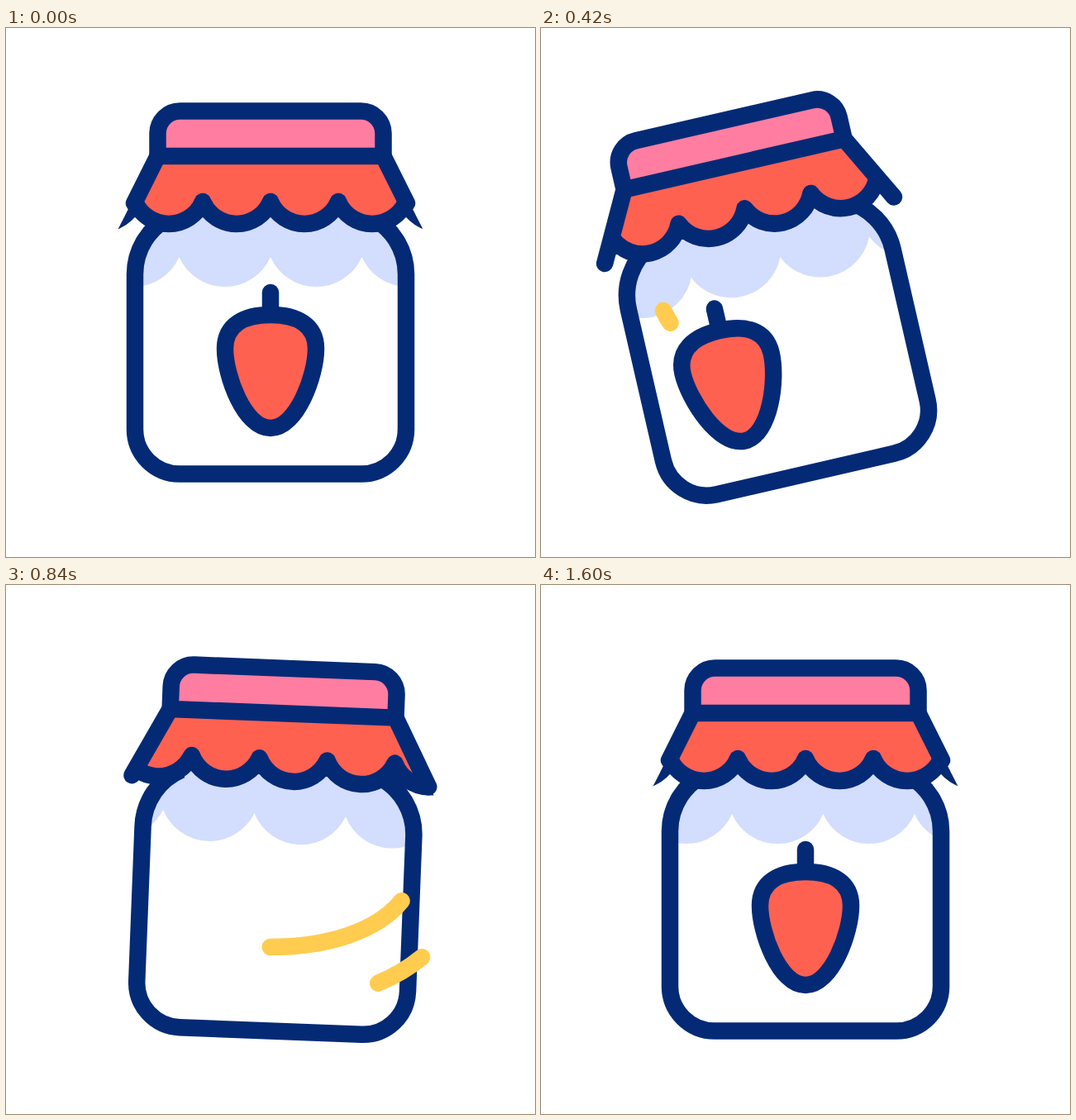
An HTML page for the animation above (2400 ms loop, 640 by 640 pixels).

```html
<!DOCTYPE html>
<html lang="en">
<head>
<meta charset="utf-8">
<title>Spinning jam jar</title>
<style>
  html, body { margin: 0; width: 100%; height: 100%; overflow: hidden; background: #fff; }
  svg { display: block; width: 100vw; height: 100vh; }
  .ink { stroke: #042a76; stroke-width: 20.5; stroke-linejoin: round; }
  .cap { stroke-linecap: round; }
  .red { fill: #ff6151; }
  .swoosh { stroke: #ffcc50; stroke-width: 20.5; }
</style>
</head>
<body>
<svg viewBox="0 0 640 640" fill="none">
  <defs>
    <clipPath id="inside">
      <path d="M200 228A77.5 77.5 0 0 0 156 298V485.500A54 54 0 0 0 210 539.500H430A54 54 0 0 0 484 485.500V298A77.5 77.5 0 0 0 440 228Z"/>
    </clipPath>
    <clipPath id="skirt">
      <path d="M186 145H454L514 262H126Z"/>
    </clipPath>
  </defs>
  <g id="jar">
    <g clip-path="url(#inside)">
      <path id="syrup" fill="#d3ddfe"/>
      <g id="berry" class="ink cap">
        <path d="M320 320V347"/>
        <path class="red" d="M320 347C352 347 375 359 375 388C375 420 352 484 320 484C288 484 265 420 265 388C265 359 288 347 320 347Z"/>
      </g>
    </g>
    <path class="ink" d="M200 228A77.5 77.5 0 0 0 156 298V485.500A54 54 0 0 0 210 539.500H430A54 54 0 0 0 484 485.500V298A77.5 77.5 0 0 0 440 228"/>
    <g clip-path="url(#skirt)">
      <path id="cloth" class="ink red"/>
    </g>
    <path id="sides" class="ink cap"/>
    <path class="ink" fill="#ff7da0" d="M183.500 155V127.500A27 27 0 0 1 210.500 100.500H429.500A27 27 0 0 1 456.500 127.500V155Z"/>
  </g>
  <path id="front" class="swoosh cap" pathLength="1" d="M148 342C175 395 235 438 320 438C400 438 475 412 494 354"/>
  <path id="back" class="swoosh cap" pathLength="1" d="M434 488C490 468 534 434 545 386"/>
</svg>
<script>
const LOOP = 2400;
const $ = id => document.getElementById(id);

const CLOTH = { step: 82, y: 210, r: 44.6, top: 120 };
const SYRUP = { step: 110.5, y: 277, r: 60.4, top: 200 };

// Steps are [ms, value], eased in and out between neighbours.
const TILT = [[0, 0], [328, -17.3], [681, 8], [1008, -3.9], [1325, 2.1], [1600, 0]];
const SPIN = [[0, 0], [305, -110], [1248, 574]];
const BERRY = [[0, 0], [305, -110], [790, 220], [840, 220], [840, -220], [1155, 0]];
const FLARE = [[0, 0], [150, 1], [1080, 1], [1250, 0]];
const FRONT = { tail: [[580, 0], [1101, 1]], head: [[348, 0], [943, 1]] };
const BACK = { tail: [[733, 0], [1255, 1]], head: [[555, 0], [1125, 1]] };

function at(steps, t) {
  if (t <= steps[0][0]) return steps[0][1];
  for (let i = 1; i < steps.length; i++) {
    const [t0, a] = steps[i - 1], [t1, b] = steps[i];
    if (t < t1) {
      const u = (t - t0) / (t1 - t0);
      return a + (b - a) * u * u * (3 - 2 * u);
    }
  }
  return steps[steps.length - 1][1];
}

function scallops({ step, y, r, top }) {
  const n = 5, left = 320 - n * step;
  const arcs = `a${r} ${r} 0 0 0 ${step} 0`.repeat(2 * n);
  return `M${left} ${top}V${y}${arcs}V${top}Z`;
}

function slide(id, x) {
  $(id).setAttribute('transform', `translate(${x.toFixed(2)} 0)`);
}

function trim(id, { tail, head }, t) {
  const a = at(tail, t), b = at(head, t), el = $(id);
  el.style.display = t > head[0][0] && a < 0.999 ? '' : 'none';
  el.setAttribute('stroke-dasharray', `${Math.max(b - a, 0.0005)} 3`);
  el.setAttribute('stroke-dashoffset', -a);
}

function draw(t) {
  const spin = at(SPIN, t), k = at(FLARE, t);
  const dx = 165 + 14.5 * k, y = 212 + 25 * k;
  $('jar').setAttribute('transform', `rotate(${at(TILT, t).toFixed(3)} 320 540)`);
  $('sides').setAttribute('d', `M${320 - dx} ${y}L183.5 155M${320 + dx} ${y}L456.5 155`);
  slide('cloth', spin % CLOTH.step);
  slide('syrup', spin % SYRUP.step);
  slide('berry', at(BERRY, t));
  trim('front', FRONT, t);
  trim('back', BACK, t);
}

$('cloth').setAttribute('d', scallops(CLOTH));
$('syrup').setAttribute('d', scallops(SYRUP));

const start = performance.now();
function tick() {
  draw((performance.now() - start) % LOOP);
  requestAnimationFrame(tick);
}
tick();
</script>
</body>
</html>
```
